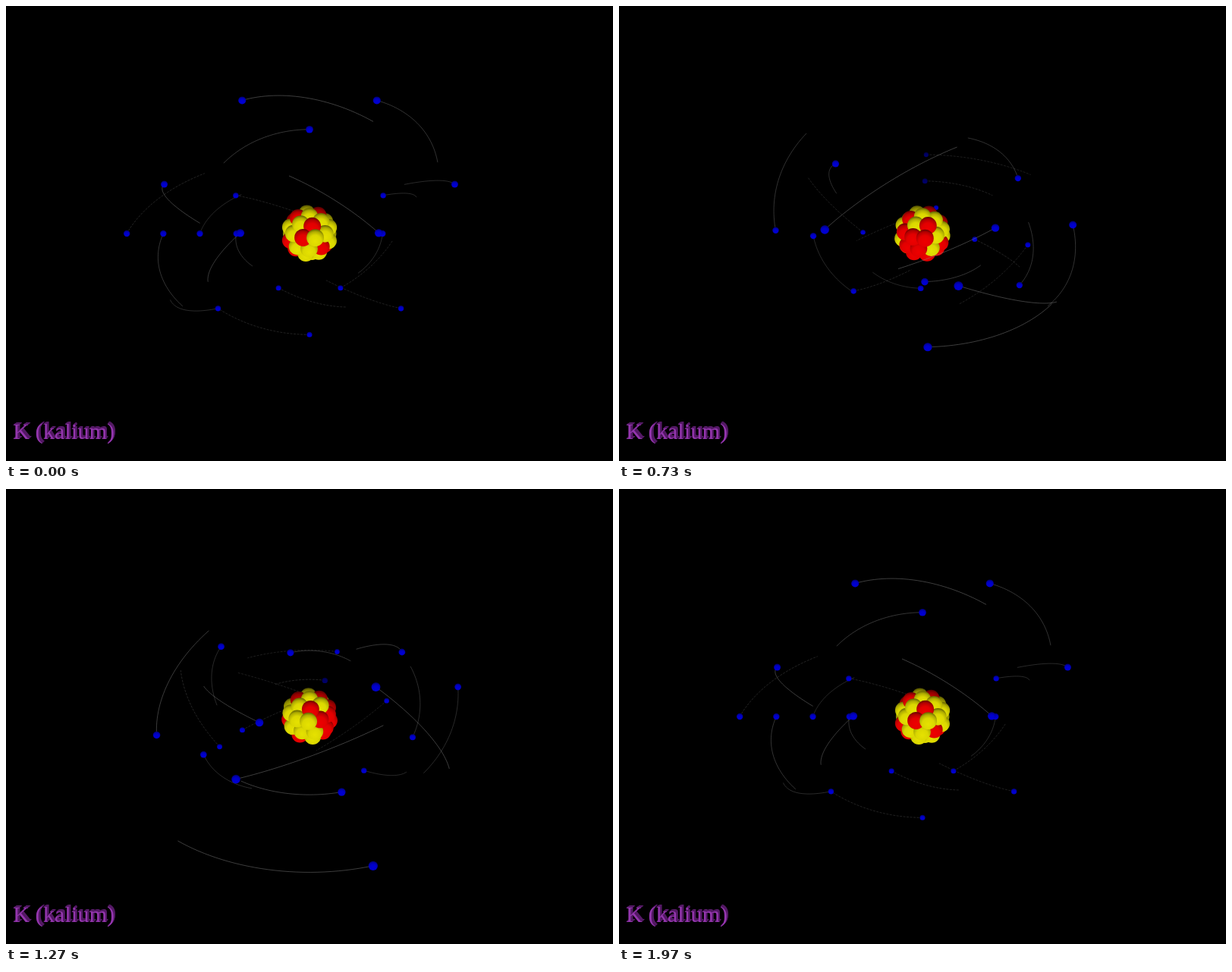
Recreate the animation shown at these times as an HTML page with a canvas. Size 800 by 600 pixels, loop 2 s.

```html
<!DOCTYPE html>
<html lang="en">
<head>
<meta charset="utf-8">
<title>Atom</title>
<style>
  html, body { margin: 0; width: 100%; height: 100%; overflow: hidden; background: #000; }
  canvas { display: block; width: 800px; height: 600px; }
</style>
</head>
<body>
<canvas id="stage" width="800" height="600"></canvas>
<script>
const ctx = document.getElementById('stage').getContext('2d');
const { cos, sin, PI, floor, hypot } = Math;
const TAU = 2 * PI, RAD = PI / 180;

// Camera looks down on the centre from 35 degrees.
const DIST = 12.5, FOCAL = 602, PITCH = 35 * RAD;
const CX = 400, CY = 300;

function project([x, y, z]) {
  const up = y * cos(PITCH) - z * sin(PITCH);
  const depth = y * sin(PITCH) + z * cos(PITCH);
  const scale = FOCAL / (DIST - depth);
  return { x: CX + x * scale, y: CY - up * scale, scale, depth };
}

// A circular orbit leaves its node at angle `node` with a tilt out of the
// upright plane; `turn` is 1 for counter-clockwise and -1 for clockwise.
function orbit(r, node, tilt, turn, start = 0) {
  const a = node * RAD, i = tilt * RAD;
  const n = [cos(a), sin(a), 0];
  const d = [-turn * cos(i) * sin(a), turn * cos(i) * cos(a), sin(i)];
  return angle => {
    const b = angle + start * RAD;
    return n.map((v, j) => r * (v * cos(b) + d[j] * sin(b)));
  };
}

const electrons = [
  orbit(2, 0, 0, 1),
  orbit(2, 180, -90, 1),
  orbit(5, 180, 90, -1)
];
const starts = [45, -90, 135, 0, -135, 90, -45, 0];
for (let k = 0; k < 8; k++) {
  const node = 22.5 * (k + 1);
  electrons.push(orbit(3, node, node - 90, -1, starts[k]));
}
for (let k = 0; k < 4; k++) {
  const high = 22.5 + 45 * k, low = 180 + 45 * k;
  electrons.push(orbit(4, high, 90 - high, 1), orbit(4, low, low - 270, 1));
}

// Rings of the nucleus: latitude, first longitude, colours.
const rings = [
  [90, 0, 'y'],
  [55, 13, 'ryryry'],
  [22, 17, 'yyyyrrryyr'],
  [-12, 35, 'ryyyrryryy'],
  [-42, -14, 'yyryrrr'],
  [-75, 30, 'yry']
];
const nucleons = rings.flatMap(([lat, lon, kinds]) =>
  [...kinds].map((kind, i) => ({
    lat: lat * RAD,
    lon: lon * RAD + i * TAU / kinds.length,
    rgb: kind === 'r' ? [238, 0, 0] : [230, 226, 0]
  })));

function ball(p, size, rgb, light = 1) {
  const r = size * p.scale;
  const tone = k => `rgb(${rgb.map(v => Math.round(v * k * light)).join(',')})`;
  const g = ctx.createRadialGradient(p.x, p.y + r * 0.4, 0, p.x, p.y + r * 0.4, r * 1.4);
  g.addColorStop(0, tone(1));
  g.addColorStop(0.5, tone(0.95));
  g.addColorStop(0.78, tone(0.76));
  g.addColorStop(1, tone(0.42));
  ctx.fillStyle = g;
  ctx.beginPath();
  ctx.arc(p.x, p.y, r, 0, TAU);
  ctx.fill();
}

function trail(path, angle, front) {
  const steps = 30;
  const pts = Array.from({ length: steps + 1 },
    (_, i) => project(path(angle - PI / 4 * i / steps)));
  const scale = (pts[0].scale + pts[steps].scale) / 2;
  ctx.beginPath();
  for (let i = 0; i < steps; i++) {
    const a = pts[i], b = pts[i + 1];
    if ((a.depth >= 0) !== front) continue;
    if (i === 0 || (pts[i - 1].depth >= 0) !== front) ctx.moveTo(a.x, a.y);
    ctx.lineTo(b.x, b.y);
  }
  const alpha = Math.min(0.5, Math.max(0.24, (scale - 20) / 80));
  ctx.strokeStyle = `rgba(145,145,145,${alpha})`;
  ctx.lineWidth = 0.85;
  ctx.setLineDash(scale < 44 ? [3, 1.5] : []);
  ctx.stroke();
}

function drawElectrons(angle, front) {
  for (const path of electrons) trail(path, angle, front);
  electrons
    .map(path => {
      const at = path(angle);
      const shaded = at[2] < 0 && hypot(at[0], at[1]) < 0.75;
      return { p: project(at), light: shaded ? 0.5 : 1 };
    })
    .filter(e => (e.p.depth >= 0) === front)
    .sort((a, b) => a.p.depth - b.p.depth)
    .forEach(e => ball(e.p, 0.087, [0, 0, 212], e.light));
}

function drawNucleus(spin) {
  const R = 0.555;
  nucleons
    .map(({ lat, lon, rgb }) => {
      const a = lon + spin;
      const z = R * cos(lat) * cos(a);
      const p = project([R * cos(lat) * sin(a), R * sin(lat), z]);
      return { p, rgb, light: z < -0.1 ? 0.8 : 1 };
    })
    .sort((a, b) => a.p.depth - b.p.depth)
    .forEach(n => ball(n.p, 0.228, n.rgb, n.light));
}

// The label is extruded backwards, so its layers shrink towards the centre.
function drawLabel() {
  ctx.font = '30.4px "Liberation Serif", "Times New Roman", serif';
  ctx.textBaseline = 'alphabetic';
  const layers = 6;
  for (let i = layers; i >= 0; i--) {
    const k = 1 - 0.008 * i / layers;
    ctx.save();
    ctx.translate(CX, CY);
    ctx.scale(k, k);
    ctx.fillStyle = i ? '#551a66' : '#9436ae';
    ctx.fillText('K (kalium)', 9 - CX, 570.5 - CY);
    ctx.restore();
  }
}

function draw(now) {
  const tick = floor((now % 2000) / 10) * 10;
  const phase = floor((tick + 3.4) * 0.03) / 59;
  ctx.fillStyle = '#000';
  ctx.fillRect(0, 0, 800, 600);
  const angle = phase * 2 * TAU;
  drawElectrons(angle, false);
  drawNucleus(phase * TAU);
  drawElectrons(angle, true);
  drawLabel();
}

let origin = null;
function loop(now) {
  if (origin === null) origin = now;
  draw(Math.max(0, now - origin));
  requestAnimationFrame(loop);
}
draw(0);
requestAnimationFrame(loop);
</script>
</body>
</html>
```
